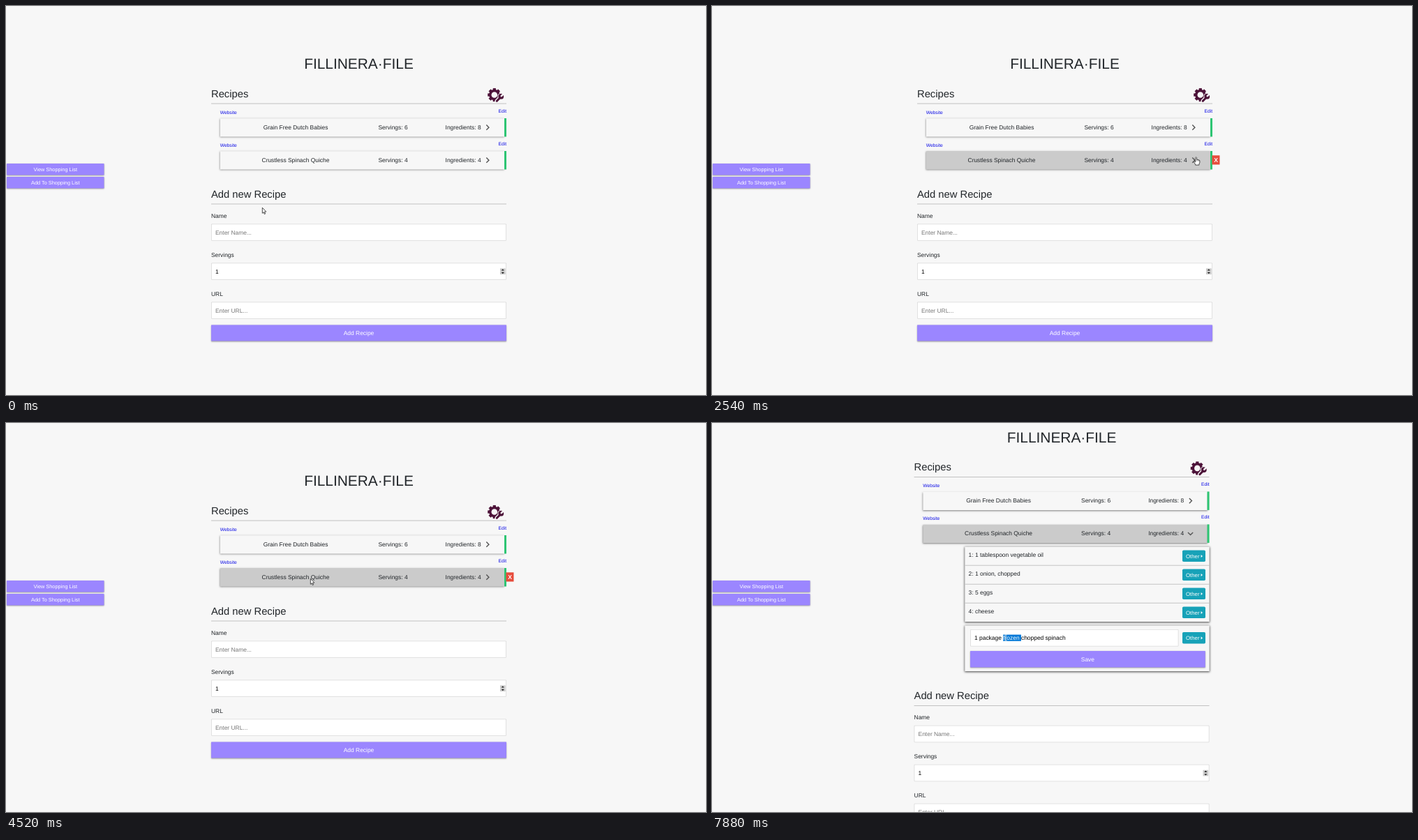
Recreate the animation shown at these times as an HTML page with a canvas. Size 1003 by 558 pixels, loop 8000 ms.

```html
<!DOCTYPE html>
<html lang="en">
<head>
<meta charset="utf-8">
<title>Recipe list</title>
<style>
html, body { margin: 0; width: 100%; height: 100%; overflow: hidden; background: #f7f7f7; }
canvas { display: block; width: 1003px; height: 558px; }
</style>
</head>
<body>
<canvas id="stage" width="1003" height="558"></canvas>
<script>
const ctx = document.getElementById('stage').getContext('2d');
const LOOP = 8000;
const BG = '#f7f7f7', INK = '#212529', PURPLE = '#9b86ff', LINK = '#0d0de6', RED = '#e74c3c';
const BODY = 8.43, SMALL = 6.69;
const SHIFT = 4.44, SCROLL = 62.6, GROW = 184;
const ENTRY = '1 package frozen chopped spinach';

// Pointer path: time, x, y
const path = [
  [30, 367, 289], [770, 320, 198], [1230, 320, 198], [1920, 573, 209], [2020, 580, 211],
  [2050, 580, 211], [2730, 720, 218], [3190, 720, 218], [3490, 673, 237], [3650, 650, 240],
  [3980, 590, 233], [4220, 430, 224], [4320, 436, 223], [5200, 436, 223], [5720, 425, 315],
  [5950, 425, 315], [6220, 422, 308], [7230, 422, 308], [7360, 422, 308],
  [7630, 431, 308], [7790, 431, 308], [7880, 421, 308]
];

const clamp = v => Math.max(0, Math.min(1, v));
const smooth = v => v * v * (3 - 2 * v);

function pointerAt(t) {
  const i = path.findIndex(p => p[0] > t);
  if (i < 1) return (i ? path[path.length - 1] : path[0]).slice(1);
  const [t0, x0, y0] = path[i - 1], [t1, x1, y1] = path[i];
  const k = smooth((t - t0) / (t1 - t0));
  return [x0 + (x1 - x0) * k, y0 + (y1 - y0) * k];
}

function text(str, x, y, size = BODY, color = INK, align = 'left', weight = '') {
  ctx.font = `${weight} ${size}px "Liberation Sans", Arial, sans-serif`;
  ctx.textAlign = align;
  ctx.fillStyle = color;
  ctx.fillText(str, x, y);
}

function box(x, y, w, h, fill, radius = 0) {
  ctx.fillStyle = fill;
  ctx.beginPath();
  ctx.roundRect(x, y, w, h, radius);
  ctx.fill();
}

function shadowBox(x, y, w, h, fill, blur, alpha, radius = 0) {
  ctx.save();
  ctx.shadowColor = `rgba(0,0,0,${alpha})`;
  ctx.shadowBlur = blur;
  ctx.shadowOffsetY = 0.8;
  box(x, y, w, h, fill, radius);
  ctx.restore();
}

function shape(points, fill, stroke, width = 1) {
  ctx.beginPath();
  points.forEach(([x, y]) => ctx.lineTo(x, y));
  ctx.closePath();
  if (fill) { ctx.fillStyle = fill; ctx.fill(); }
  if (stroke) { ctx.strokeStyle = stroke; ctx.lineWidth = width; ctx.stroke(); }
}

function line(points, color, width) {
  ctx.beginPath();
  points.forEach(([x, y]) => ctx.lineTo(x, y));
  ctx.strokeStyle = color;
  ctx.lineWidth = width;
  ctx.stroke();
}

function disc(x, y, r, fill) {
  ctx.beginPath();
  ctx.arc(x, y, r, 0, Math.PI * 2);
  ctx.fillStyle = fill;
  ctx.fill();
}

function heading(str, y) {
  text(str, 294, y, 14.75);
  box(294, y + 9, 423, 1, '#c2c2c2');
}

function button(label, x, y, w, h, size = BODY) {
  shadowBox(x, y, w, h, PURPLE, 2, 0.4, 0.5);
  text(label, x + w / 2, y + h / 2 + size * 0.345, size, '#fff', 'center');
}

function input(x, y, w, h, border = '#dadada') {
  box(x, y, w, h, border, 1);
  box(x + 0.8, y + 0.8, w - 1.6, h - 1.6, '#fff', 0.5);
}

function deleteBox(x, y) {
  box(x, y, 11, 13.2, RED);
  text('X', x + 5.5, y + 9.9, 8.6, '#fff', 'center', 'bold');
}

function tools() {
  const color = '#4d1339', cx = 699.8, cy = 127.5;
  for (let i = 0; i < 8; i++) {
    const a = i * Math.PI / 4, c = Math.cos(a), s = Math.sin(a);
    line([[cx, cy], [cx + c * 9.6, cy + s * 9.6]], color, 4.2);
  }
  disc(cx, cy, 7.8, color);
  disc(cx, cy, 4.3, BG);
  ctx.lineCap = 'round';
  line([[703, 136.3], [709, 130]], BG, 5.2);
  disc(709.3, 129.7, 4.9, BG);
  line([[703.3, 136.3], [709, 130.5]], color, 3);
  disc(709.3, 129.7, 3.9, color);
  line([[709.8, 129.2], [713.5, 125.5]], BG, 2.6);
  ctx.lineCap = 'butt';
}

function recipe(y, name, servings, count, state = {}) {
  const blue = state.link ? '#0056b3' : LINK;
  text('Website', 306.7, y - 6.2, SMALL, blue);
  if (state.link) box(306.7, y - 5.3, 24, 0.6, blue);
  text('Edit', 717, y - 8.3, SMALL, LINK, 'right');
  shadowBox(306.8, y + 0.3, 407.4, 26.2, state.gray ? '#cbcbcb' : BG, 2.4, 0.5);
  box(714, y, 3, 26.5, '#2ec573');
  const base = y + 16;
  text(name, 415, base, BODY, INK, 'center');
  text('Servings: ' + servings, 533.5, base);
  text('Ingredients: ' + count, 680.6, base, BODY, INK, 'right');
  const cx = 690, cy = y + 13.2;
  line(state.open
    ? [[cx - 3.6, cy - 1.6], [cx, cy + 2], [cx + 3.6, cy - 1.6]]
    : [[cx - 1.7, cy - 3.6], [cx + 1.9, cy], [cx - 1.7, cy + 3.6]], '#555', 1.4);
  if (state.remove) deleteBox(716.5, y + 6.3);
}

function otherButton(y) {
  box(674, y, 33, 16.6, '#17a2b8', 1.8);
  text('Other', 679, y + 11, 7.8, '#fff');
  shape([[700.6, y + 6.4], [703, y + 8.5], [700.6, y + 10.6]], '#fff');
}

// Ingredient list and its entry field
function details(t, hovered) {
  shadowBox(362.3, 177.5, 350.4, 107.6, BG, 3, 0.75);
  ['1 tablespoon vegetable oil', '1 onion, chopped', '5 eggs', 'cheese'].forEach((item, i) => {
    const y = 177.5 + 27 * i;
    if (i) box(362.3, y - 0.8, 350.4, 1, '#c4c4c4');
    text(`${i + 1}: ${item}`, 367.6, y + 14.3);
    otherButton(y + 5);
    if (hovered === i) deleteBox(712.2, y + 6.3 + 27 - 27);
  });
  shadowBox(362.3, 290.6, 350.4, 65.4, BG, 3, 0.75);

  const typed = ENTRY.slice(0, Math.ceil(ENTRY.length * clamp((t - 6510) / 700)));
  if (typed) {
    input(370, 296, 298.5, 24.6);
  } else {
    ctx.save();
    ctx.shadowColor = 'rgba(255,0,0,.55)';
    ctx.shadowBlur = 2;
    input(370, 296, 298.5, 24.6, '#f0504f');
    ctx.restore();
    box(370.8, 296.8, 296.9, 23, '#fff');
  }
  text(typed || 'Enter Ingredient...', 376, 311, BODY, typed ? '#000' : '#777');
  const before = ctx.measureText('1 package ').width;
  if (t > 7500) {
    box(376 + before, 303.6, ctx.measureText('frozen ').width, 9.2, '#0078d7');
    text('frozen', 376 + before, 311, BODY, '#fff');
  } else if (t > 5980) {
    box(376 + ctx.measureText(typed).width, 303.2, 0.7, 9.8, '#000');
  }
  otherButton(299.9);
  button('Save', 370, 327, 336.8, 23.4);
}

function newRecipe() {
  heading('Add new Recipe', 274.5);
  const fields = [['Name', 'Enter Name...', '#777'], ['Servings', '1', '#000'], ['URL', 'Enter URL...', '#777']];
  fields.forEach(([label, value, color], i) => {
    const y = 304 + 56 * i;
    text(label, 294, y);
    input(294, y + 8.4, 423, 24.4);
    text(value, 300, y + 23.8, BODY, color);
  });
  box(708, 376.4, 7.6, 8.6, '#c9c9c9');
  box(708.6, 380.4, 6.4, 0.6, '#f4f4f4');
  shape([[709.8, 379.6], [711.8, 377.2], [713.8, 379.6]], '#222');
  shape([[709.8, 381.8], [711.8, 384.2], [713.8, 381.8]], '#222');
  button('Add Recipe', 294, 457.4, 423, 23.2);
}

function pointer(kind, x, y) {
  ctx.save();
  ctx.translate(x, y);
  ctx.lineJoin = 'round';
  if (kind === 'arrow') {
    shape([[0.3, 0.3], [0.3, 8.3], [2.1, 6.7], [3.3, 9.6], [4.6, 9], [3.4, 6.2], [5.8, 6.1]], '#fff', '#222', 0.8);
  } else if (kind === 'hand') {
    shape([[-0.9, 0.8], [0, 0.1], [0.9, 0.8], [0.9, 3.6], [2.6, 3.8], [4.2, 4.3], [5.3, 5],
      [5.3, 8], [4.4, 9.8], [4.4, 11.4], [-1, 11.4], [-1.2, 10], [-3.4, 6.6], [-2.6, 5.8], [-0.9, 7.2]], '#fff', '#222', 0.8);
    [0.9, 2.5, 4].forEach(px => line([[px, 4], [px, 6]], '#444', 0.5));
  } else {
    line([[0, -4], [0, 4]], t0Ink(), 0.9);
    line([[-1.7, -4.2], [1.7, -4.2]], t0Ink(), 0.7);
    line([[-1.7, 4.2], [1.7, 4.2]], t0Ink(), 0.7);
  }
  ctx.restore();
}

let beamColor = '#222';
const t0Ink = () => beamColor;

function draw(t) {
  const [x, y] = pointerAt(t);
  const open = t >= 4550;
  const scroll = SCROLL * smooth(clamp((t - 4580) / 250));
  const py = y + scroll;
  const inItem = py > 194 && py < 241;
  const onLink = inItem && py < 207 && x < 332;
  const onRow = py > 207 && py < 241 && x < 714;
  const lostHover = t > 3600 && t < 4010;

  ctx.fillStyle = BG;
  ctx.fillRect(0, 0, 1003, 558);

  ctx.save();
  ctx.translate(open ? -SHIFT : 0, -scroll);
  text('FILLINERA·FILE', 505.5, 90.2, 20.9, INK, 'center');
  heading('Recipes', 130.5);
  tools();
  recipe(161, 'Grain Free Dutch Babies', 6, 8);
  recipe(208, 'Crustless Spinach Quiche', 4, 4, {
    gray: onRow || t > 3300, link: onLink, open, remove: inItem && !lostHover && !(open && py > 240)
  });
  if (open) {
    ctx.save();
    ctx.translate(SHIFT, SCROLL);
    details(t, Math.floor((py - 240.1) / 27));
    ctx.restore();
    ctx.translate(0, GROW);
  }
  newRecipe();
  ctx.restore();

  button('View Shopping List', 1, 226, 139.5, 16.4, 7.38);
  button('Add To Shopping List', 1, 245, 139.5, 16.4, 7.38);

  if (t >= 1030 && t < 1230) {
    box(0, 551, 355, 7, '#d5d5d5');
    box(0, 551.6, 354.4, 7, '#f0f0f0');
  }

  beamColor = t > 7500 ? '#e8e8e8' : '#222';
  const kind = open && py > 358 ? 'beam' : inItem && t < 3300 ? 'hand' : 'arrow';
  pointer(kind, x, y);
}

ctx.textRendering = 'geometricPrecision';
function tick() {
  draw(performance.now() % LOOP);
  requestAnimationFrame(tick);
}
tick();
</script>
</body>
</html>
```
